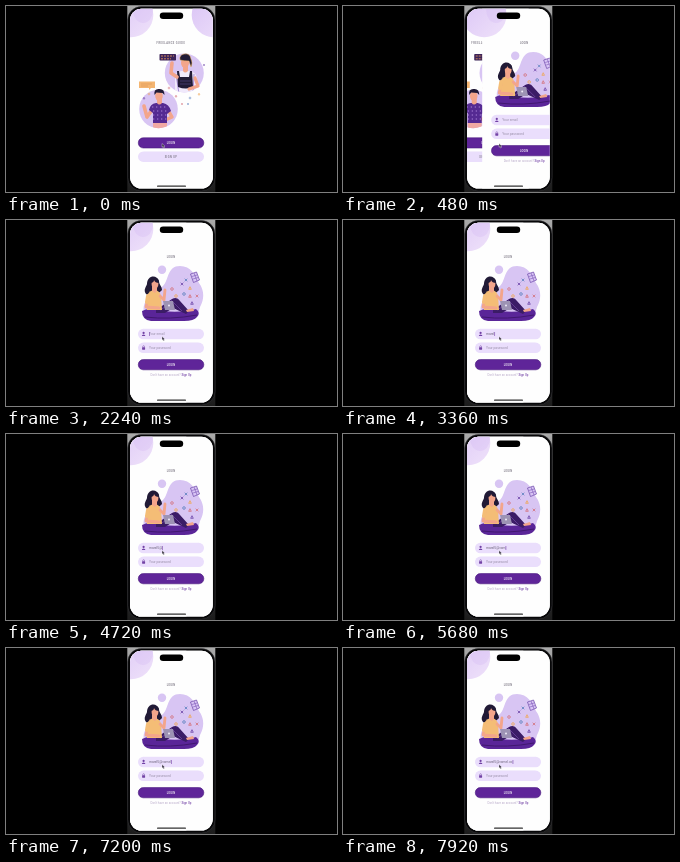
An HTML page for the animation above (8 s loop, 331 by 186 pixels).

```html
<!DOCTYPE html>
<html lang="en">
<head>
<meta charset="utf-8">
<title>Login flow</title>
<style>
html, body { margin: 0; width: 100%; height: 100%; overflow: hidden; background: #000; }
svg { display: block; width: 100vw; height: 100vh; }
text { font: 3.3px Roboto, sans-serif; fill: #978da6; }
.cap { font-size: 2.6px; font-weight: 500; letter-spacing: .2px; text-anchor: middle; fill: #77727f; }
.btn { fill: #5f2599; }
.edge { stroke: #48197c; stroke-width: .6; }
.pale { fill: #eadefc; }
.lilac { fill: #d8c5f3; }
.skin { fill: #f3a58b; }
.ink { fill: #211a36; }
.limb { fill: none; stroke: #f3a58b; stroke-linecap: round; stroke-linejoin: round; }
</style>
</head>
<body>
<svg viewBox="0 0 331 186">
  <defs>
    <linearGradient id="wall" x2="0" y2="1">
      <stop stop-color="#aaa"/><stop offset=".5" stop-color="#555"/><stop offset="1" stop-color="#1c1c1c"/>
    </linearGradient>
    <linearGradient id="glow" x2="1" y2="1">
      <stop stop-color="#d9c2f5"/><stop offset="1" stop-color="#efe2fa"/>
    </linearGradient>
    <clipPath id="screen"><rect x="124" y="2.800" width="82.800" height="179.700" rx="11.500"/></clipPath>
    <clipPath id="low"><circle cx="152.500" cy="103" r="19.300"/></clipPath>
    <clipPath id="high"><circle cx="178.300" cy="67" r="19.500"/></clipPath>
  </defs>
  <rect x="121.300" width="88" height="186" fill="url(#wall)"/>
  <rect x="121.700" y=".5" width="87.300" height="184.500" rx="13.500" fill="#070708" stroke="#3c3c40" stroke-width=".5"/>
  <g clip-path="url(#screen)">
    <rect x="123" y="2" width="85" height="182" fill="#fefefe"/>

    <g id="welcome">
      <rect x="123" y="2" width="85" height="182" fill="#fefefe"/>
      <g id="corner">
        <circle cx="125" cy="9" r="22.300" fill="url(#glow)"/>
        <ellipse cx="137" cy="4" rx="10" ry="13" fill="#cfb5f2" opacity=".3"/>
      </g>
      <text class="cap" x="165" y="38.200" style="letter-spacing:.45px">FREELANCE GUIDE</text>
      <circle class="lilac" cx="178.300" cy="67" r="19.500"/>
      <g clip-path="url(#high)">
        <path d="M169 89V70q1-4 6-5h8q7 1 8 7l1 17Z" fill="#f0e9fb"/>
        <path d="M170 68l3 20M188 68l-1 20" stroke="#a88fd8" stroke-width="1"/>
        <path class="ink" d="M173 65l1 6h9l1-6h2l1 16q-7 3-15 0l-1-16Z"/>
        <path d="M174 75h11M174 78h11" stroke="#5a4b86" stroke-width=".6"/>
      </g>
      <path class="limb" d="M171 71l-6-4 1-10" stroke-width="3.600"/>
      <path class="limb" d="M189 72l3 8-9 3" stroke-width="3.200"/>
      <path class="skin" d="M177 58h5v7q-3 3-5 0Z"/>
      <ellipse class="skin" cx="179" cy="57" rx="4" ry="4.800"/>
      <path class="ink" d="M174 54q-1-5 4-6 6-1 7 5 2 4 0 8l-2-6q-5 0-9-1Z" stroke="#f3b95b" stroke-width=".5"/>
      <rect x="153.500" y="48" width="16.500" height="6.500" rx=".8" fill="#3c2459"/>
      <path d="M155 50h13M155 52.800h10" stroke="#f29c58" stroke-width=".8" stroke-dasharray="2 1"/>

      <circle class="lilac" cx="152.500" cy="103" r="19.300"/>
      <path class="limb" d="M146 104l-5 7-3-11" stroke-width="3.600"/>
      <path class="limb" d="M162 104l4 7-9 4" stroke-width="3.400"/>
      <g clip-path="url(#low)">
        <path d="M143 104q1-6 7-7h7q6 1 8 8l-4 3v9h-14v-10Z" fill="#552a92"/>
        <path d="M146 101h16M147 105h15M147 109h14M147 113h14" stroke="#b38be0" stroke-width=".9" stroke-dasharray="1.300 2.700"/>
        <path d="M147 117h14v7h-14Z" fill="#f0a9a3"/>
      </g>
      <path class="skin" d="M151 92h5v5q-3 3-5 0Z"/>
      <ellipse class="skin" cx="153" cy="90" rx="3.800" ry="4.800"/>
      <path class="ink" d="M148.500 89q-1-6 4-6 6-1 6 6l-2-2-6-.5Z"/>
      <path d="M133 75.500h16v6.500h-4l-2 2v-2h-10Z" fill="#f4b571"/>
      <path d="M135 78h11M135 80h7" stroke="#d89555" stroke-width=".6"/>
      <g id="bits"></g>

      <rect class="btn edge" x="132.300" y="131.800" width="65.500" height="10.200" rx="5"/>
      <text class="cap" x="165" y="137.900" style="fill:#fff">LOGIN</text>
      <rect class="pale" x="132" y="145.400" width="66" height="10.500" rx="5.250"/>
      <text class="cap" x="165" y="151.600" style="letter-spacing:.4px">SIGN UP</text>
    </g>

    <g id="login">
      <rect x="123" y="2" width="85" height="182" fill="#fefefe"/>
      <use href="#corner"/>
      <text class="cap" x="165" y="38">LOGIN</text>
      <circle class="lilac" cx="156" cy="49.700" r="4.200"/>
      <path class="lilac" d="M138 93c-3-14 11-21 19-27 6-6 4-20 17-20 11 0 15 9 19 17 6 8 5 17 1 24-2 8-4 13-12 13h-30Z"/>
      <path d="M136 91q7-4 20 0 20 2 34-2 5 4 1 8-3 4-13 4h-33q-9-1-9-10Z" fill="#5a2598"/>
      <path d="M139 97q25 3 52-2" stroke="#40176f" stroke-width="1" fill="none"/>
      <path d="M150 90l16-11q5-3 8 2l9 10-3 3-13-6-8 5h-9Z" fill="#3b1c66"/>
      <path d="M165 80l11 11M154 90l10-6" stroke="#7549a5" stroke-width=".7"/>
      <path class="skin" d="M180 90l7-2 1 3-7 1Z"/>
      <path class="ink" d="M140 74c-3-4 0-7 1-10 0-9 10-10 12-3 0 4 3 5 3 9-3 4-13 7-16 4Z"/>
      <path d="M141 76q2-6 8-6 5 1 6 6l1 14h-15Z" fill="#f4bd76"/>
      <path class="limb" d="M142 78l-2 9 13 1M154 76l4 4 1-10" stroke-width="2.800"/>
      <path d="M142 76l-1 6" stroke="#f4bd76" stroke-width="4" stroke-linecap="round"/>
      <path class="skin" d="M146 66h5v5l-2 2-3-2Z"/>
      <ellipse class="skin" cx="149" cy="64" rx="3.400" ry="4.200"/>
      <path class="ink" d="M144 63q0-6 5-5 4 0 4 5-4 0-5-3 0 3-4 3Z"/>
      <path d="M157 81h10l2 9h-10Z" fill="#9d93b4"/>
      <circle cx="163" cy="85.500" r="1" fill="#eee9f7"/>
      <path d="M184.500 54l6-2 3 8-6 2.500Z" fill="#d9c5f5" stroke="#6a45a8" stroke-width=".7"/>
      <path d="M186 56.500l5-1.500M187 59l5-1.500M188 53l3 8" stroke="#7b56b5" stroke-width=".6"/>
      <g id="icons"></g>

      <rect class="pale" x="132" y="108.800" width="66" height="10.500" rx="5.250"/>
      <rect class="pale" x="132" y="122.600" width="66" height="10.500" rx="5.250"/>
      <g fill="#7242a5">
        <circle cx="137.600" cy="112.900" r="1.100"/>
        <path d="M135.800 116q0-1.500 1.800-1.500t1.800 1.500Z"/>
        <rect x="136.100" y="127.200" width="3" height="2.500" rx=".4"/>
      </g>
      <path d="M136.700 127.300v-.6q0-1 .9-1t.9 1v.6" fill="none" stroke="#7242a5" stroke-width=".5"/>
      <text id="mail" x="143" y="115.200"></text>
      <rect id="caret" class="btn" y="112" width=".5" height="4"/>
      <text x="143" y="129">Your password</text>
      <rect class="btn edge" x="132.300" y="139.600" width="65.500" height="10.200" rx="5"/>
      <text class="cap" x="165" y="145.700" style="fill:#fff">LOGIN</text>
      <text x="165" y="155.600" text-anchor="middle" style="font-size:2.950px;fill:#b7a8c8">Don’t have an account? <tspan font-weight="500" fill="#7b4dab">Sign Up</tspan></text>
    </g>
    <rect x="151" y="179.600" width="29" height="1.200" rx=".6" fill="#333"/>
  </g>
  <rect x="153.800" y="6.600" width="23.400" height="6.500" rx="3.250"/>
  <path id="cursor" d="M0 0v3.800l.9-.8.7 1.500.8-.4-.7-1.400h1.200Z" fill="#2a2533" stroke="#fff" stroke-width=".35"/>
</svg>
<script>
const $ = id => document.getElementById(id);
const LOOP = 8000, WIDTH = 83;
const address = "marel5@vomel.co";
const keys = [2400, 2640, 2800, 3040, 3280, 4000, 4560, 4960,
  5120, 5360, 5760, 5920, 7360, 7600, 7840];
const colors = ["#d36f78", "#6c43a6", "#f0a652", "#587fbd"];

function scatter(id, size, points) {
  $(id).innerHTML = points.map(([x, y], i) => {
    const d = ["M-1 0a1 1 0 1 0 2 0a1 1 0 1 0-2 0", "M-1-1L1 1M-1 1L1-1", "M-1 1L0-1L1 1Z"][i % 3];
    return `<path d="${d}" transform="translate(${x} ${y}) scale(${size})" fill="none" stroke="${colors[i % 4]}" stroke-width=".6"/>`;
  }).join("");
}
scatter("bits", .9, [[163, 82], [198, 59], [193, 88], [184, 92], [176, 98],
  [138, 92], [143, 88], [182, 98], [170, 90]]);
scatter("icons", 1.3, [[166, 69], [176, 64], [184, 68], [178, 74], [191, 76],
  [186, 83], [170, 76], [180, 60], [184, 76]]);

const clamp = v => Math.max(0, Math.min(1, v));
const ease = v => v * v * (3 - 2 * v);
const move = (id, x, y) => $(id).setAttribute("transform", `translate(${x} ${y})`);

function draw(t) {
  // The new page slides in over the old one, which drifts left
  const push = 1 - (1 - clamp((t - 320) / 480)) ** 4;
  move("welcome", -push * WIDTH / 3, 0);
  move("login", (1 - push) * WIDTH, 0);

  const p = ease(clamp((t - 640) / 1120));
  move("cursor", 156 + 2.5 * Math.sin(Math.PI * p), 137.5 - 21 * p);

  const typed = keys.filter(k => k <= t).length;
  const mail = $("mail");
  mail.textContent = typed ? address.slice(0, typed) : "Your email";
  mail.style.fill = typed ? "#6a6178" : "";
  const last = typed ? keys[typed - 1] : 1920;
  const lit = t >= last && (t - last) % 1000 < 500;
  $("caret").setAttribute("x", 143.2 + (typed ? mail.getComputedTextLength() : 0));
  $("caret").setAttribute("opacity", lit ? 1 : 0);
}

const start = performance.now();
function tick() {
  draw((performance.now() - start) % LOOP);
  requestAnimationFrame(tick);
}
tick();
</script>
</body>
</html>
```
